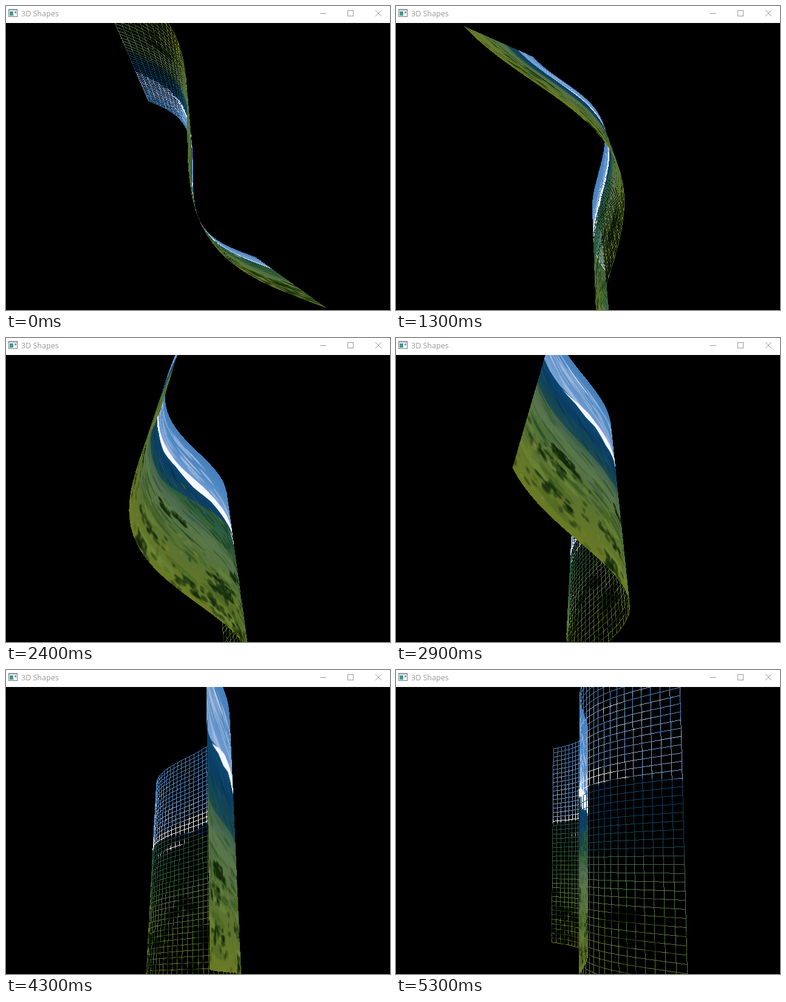
Animation, 632 px wide and 501 px high, one loop 5.4 s. Source, as an HTML page with a canvas:

```html
<!DOCTYPE html>
<html lang="en">
<head>
<meta charset="utf-8">
<title>3D Shapes</title>
<style>
  html, body { margin: 0; width: 100%; height: 100%; overflow: hidden; background: #000; }
  svg, canvas { position: absolute; left: 0; display: block; }
  svg { top: 0; background: #fff; }
  canvas { top: 28px; }
  text { font: 12.5px "Open Sans", "Noto Sans", sans-serif; fill: #999; }
  .btn { fill: none; stroke: #999; }
</style>
</head>
<body>
<svg width="632" height="28" viewBox="0 0 632 28">
  <defs>
    <linearGradient id="pane" x1="0" y1="0" x2="1" y2="1">
      <stop offset="0" stop-color="#4a86b8"/><stop offset="1" stop-color="#4aa564"/>
    </linearGradient>
  </defs>
  <g shape-rendering="crispEdges">
    <rect x="4.5" y="5.5" width="14" height="12" fill="#fff" stroke="#6c7a86"/>
    <rect x="5" y="6" width="13" height="2" fill="#b9c6d0"/>
    <rect x="6" y="9" width="6" height="7" fill="url(#pane)"/>
    <rect x="14" y="9" width="3" height="3" fill="#7f97a8"/>
    <path class="btn" d="M517 12.5H527M562.5 7.5h9v9h-9z"/>
  </g>
  <path class="btn" d="M608 7l10 10M618 7l-10 10"/>
  <text x="25" y="17">3D Shapes</text>
</svg>
<canvas id="view" width="632" height="473"></canvas>
<script>
const W = 632, H = 473, CX = 316, CY = 240, FOCAL = 579.4;
const N = 44, TEX = 256, RAD = Math.PI / 180;
const FRAME = 100, LOOP = 5400;
// Spin progress at a few frame indices; linear in between.
const SPIN = [[0, 207.45], [8, 212.2], [18, 217.1], [29, 223.25], [36, 227.35], [43, 232.3], [53, 238.2]];

const ctx = document.getElementById('view').getContext('2d');
const image = ctx.createImageData(W, H);
const out = image.data;
const near = new Float32Array(W * H);
const tex = paintLandscape();

function paintLandscape() {
  const c = document.createElement('canvas');
  c.width = c.height = TEX;
  const g = c.getContext('2d', { willReadFrequently: true });
  let seed = 11;
  const rnd = (a = 0, b = 1) => {
    seed = (seed * 1664525 + 1013904223) % 4294967296;
    return a + (b - a) * seed / 4294967296;
  };
  const fade = (y0, y1, ...stops) => {
    const f = g.createLinearGradient(0, y0, 0, y1);
    stops.forEach((s, i) => f.addColorStop(i / (stops.length - 1), s));
    return f;
  };
  const shape = (fill, ...p) => {
    g.fillStyle = fill;
    g.beginPath();
    for (let i = 0; i < p.length; i += 2) g.lineTo(p[i], p[i + 1]);
    g.fill();
  };
  const blobs = (n, y0, y1, rx, ry, tilt, colors, x0 = 0, x1 = TEX) => {
    for (let i = 0; i < n; i++) {
      g.fillStyle = colors[i % colors.length];
      g.beginPath();
      g.ellipse(rnd(x0, x1), rnd(y0, y1), rnd(rx / 3, rx), rnd(ry / 3, ry), tilt, 0, 7);
      g.fill();
    }
  };
  const bushes = (n, y0, y1, size) => {
    while (n--) {
      const x = rnd(0, TEX), y = rnd(y0, y1);
      blobs(18, y - size * 0.5, y + size * 0.5, 4, 3, 0,
        ['rgba(18,42,12,.7)', 'rgba(28,56,16,.6)', 'rgba(12,32,10,.6)'], x - size, x + size);
      blobs(4, y - size * 0.7, y, 2, 1.5, 0, ['rgba(96,122,44,.6)'], x - size, x + size);
    }
  };

  // Sky
  g.fillStyle = fade(0, 105, '#4580bc', '#5089c4', '#86a9da');
  g.fillRect(0, 0, TEX, TEX);
  blobs(60, 26, 90, 20, 4, 0.25, ['rgba(206,212,234,.42)', 'rgba(172,192,226,.35)'], 0, 130);
  blobs(24, 30, 88, 20, 4, 0.35, ['rgba(204,214,236,.35)'], 120, 256);

  // Far mountains and snow
  shape(fade(88, 172, '#0c4a7c', '#0a3d62', '#164850', '#30574a'),
    0, 100, 25, 95, 45, 86, 60, 84, 95, 90, 140, 94, 190, 100, 256, 102, 256, 190, 0, 190);
  shape('#f4f7fc', 28, 96, 46, 85, 60, 80, 82, 83, 108, 85, 140, 82, 172, 86, 215, 92, 256, 96,
    256, 102, 215, 100, 176, 105, 150, 99, 128, 103, 104, 96, 84, 100, 68, 92, 56, 95, 44, 92);
  blobs(40, 98, 145, 9, 2, 0.6, ['rgba(36,98,130,.4)', 'rgba(5,36,60,.5)', 'rgba(40,78,72,.4)'], 0, 140);

  // Right hill
  shape(fade(100, 200, '#23504a', '#2f5f3a', '#4d7433'),
    90, 150, 130, 128, 175, 108, 215, 103, 256, 102, 256, 220, 60, 220);
  shape('#e8eff4', 178, 112, 200, 111, 214, 117, 230, 118, 224, 122, 204, 119, 190, 117);
  blobs(150, 112, 190, 9, 3, 0.35,
    ['rgba(18,56,44,.55)', 'rgba(76,112,52,.45)', 'rgba(28,64,32,.5)'], 110, 256);

  // Meadow
  shape(fade(148, 256, '#3b5f4c', '#58764c', '#557236', '#5e742c', '#6a7a24'),
    0, 152, 50, 150, 100, 150, 150, 160, 200, 172, 256, 176, 256, 256, 0, 256);
  blobs(230, 150, 215, 13, 2, 0.12,
    ['rgba(100,128,66,.4)', 'rgba(30,64,30,.5)', 'rgba(92,106,100,.35)', 'rgba(52,92,36,.5)']);
  blobs(50, 200, 250, 18, 4, 0.1, ['rgba(112,138,58,.55)', 'rgba(66,96,34,.5)']);
  bushes(9, 170, 195, 7);
  bushes(22, 204, 250, 13);
  blobs(220, 195, 256, 3, 3, 0, ['rgba(20,44,12,.5)', 'rgba(122,134,48,.45)', 'rgba(66,92,28,.5)']);
  return g.getImageData(0, 0, TEX, TEX).data;
}

// Depth-tested, bilinearly textured pixel; w is 1 / depth.
function put(x, y, w, s, t) {
  if (x < 0 || y < 0 || x >= W || y >= H) return;
  const i = y * W + x;
  if (w < near[i]) return;
  near[i] = w;
  const max = TEX - 1.001;
  const u = Math.min(max, Math.max(0, s / w * TEX - 0.5));
  const v = Math.min(max, Math.max(0, (1 - t / w) * TEX - 0.5));
  const iu = u | 0, iv = v | 0, fu = u - iu, fv = v - iv;
  const p = (iv * TEX + iu) * 4, q = p + TEX * 4;
  for (let k = 0; k < 3; k++) {
    const top = tex[p + k] + (tex[p + 4 + k] - tex[p + k]) * fu;
    const low = tex[q + k] + (tex[q + 4 + k] - tex[q + k]) * fu;
    out[i * 4 + k] = top + (low - top) * fv;
  }
}

function line(a, b) {
  const n = Math.max(1, Math.ceil(Math.max(Math.abs(b.x - a.x), Math.abs(b.y - a.y))));
  const mix = (k, f) => a[k] + (b[k] - a[k]) * f;
  for (let i = 0; i <= n; i++) {
    const f = i / n;
    put(Math.floor(mix('x', f)), Math.floor(mix('y', f)), mix('w', f), mix('s', f), mix('t', f));
  }
}

function triangle(a, b, c) {
  const area = (b.x - a.x) * (c.y - a.y) - (b.y - a.y) * (c.x - a.x);
  if (!area) return;
  const x0 = Math.max(0, Math.floor(Math.min(a.x, b.x, c.x)));
  const x1 = Math.min(W - 1, Math.ceil(Math.max(a.x, b.x, c.x)));
  const y0 = Math.max(0, Math.floor(Math.min(a.y, b.y, c.y)));
  const y1 = Math.min(H - 1, Math.ceil(Math.max(a.y, b.y, c.y)));
  for (let y = y0; y <= y1; y++) {
    for (let x = x0; x <= x1; x++) {
      const px = x + 0.5 - a.x, py = y + 0.5 - a.y;
      const f = (px * (c.y - a.y) - py * (c.x - a.x)) / area;
      const g = ((b.x - a.x) * py - (b.y - a.y) * px) / area;
      const e = 1 - f - g;
      if (e < 0 || f < 0 || g < 0) continue;
      put(x, y, e * a.w + f * b.w + g * c.w, e * a.s + f * b.s + g * c.s, e * a.t + f * b.t + g * c.t);
    }
  }
}

function spinAt(frame) {
  let i = 1;
  while (i < SPIN.length - 1 && frame > SPIN[i][0]) i++;
  const [f0, k0] = SPIN[i - 1], [f1, k1] = SPIN[i];
  return k0 + (k1 - k0) * (frame - f0) / (f1 - f0);
}

function draw(frame) {
  const spin = spinAt(frame), shift = Math.floor(spin * 5 + 1e-6);
  const ax = spin * 3 * RAD, ay = spin * 2 * RAD;
  const sa = Math.sin(ax), ca = Math.cos(ax), sb = Math.sin(ay), cb = Math.cos(ay);

  const vertex = (i, j) => {
    const x = i / 5 - 4.5, y = j / 5 - 4.5, z = Math.sin((i + shift) * 8 * RAD);
    const rx = x * cb + z * sb, rz = z * cb - x * sb;
    const w = 1 / (12 - (y * sa + rz * ca));
    return {
      x: CX + rx * FOCAL * w, y: CY - (y * ca - rz * sa) * FOCAL * w,
      w, s: i / N * w, t: j / N * w
    };
  };
  const grid = [];
  for (let i = 0; i <= N; i++) {
    grid.push([]);
    for (let j = 0; j <= N; j++) grid[i].push(vertex(i, j));
  }

  near.fill(0);
  for (let i = 0; i < out.length; i += 4) {
    out[i] = out[i + 1] = out[i + 2] = 0;
    out[i + 3] = 255;
  }
  for (let i = 0; i < N; i++) {
    for (let j = 0; j < N; j++) {
      const a = grid[i][j], b = grid[i][j + 1], c = grid[i + 1][j + 1], d = grid[i + 1][j];
      const turn = (c.x - a.x) * (b.y - d.y) - (c.y - a.y) * (b.x - d.x);
      // One side of the flag is solid, the other is wireframe.
      if (turn < 0) {
        triangle(a, b, c);
        triangle(a, c, d);
      } else {
        line(a, b); line(b, c); line(c, d); line(d, a);
      }
    }
  }
  ctx.putImageData(image, 0, 0);
}

let shown = -1;
function tick() {
  const frame = Math.floor(performance.now() % LOOP / FRAME);
  if (frame !== shown) draw(shown = frame);
  requestAnimationFrame(tick);
}
tick();
</script>
</body>
</html>
```
